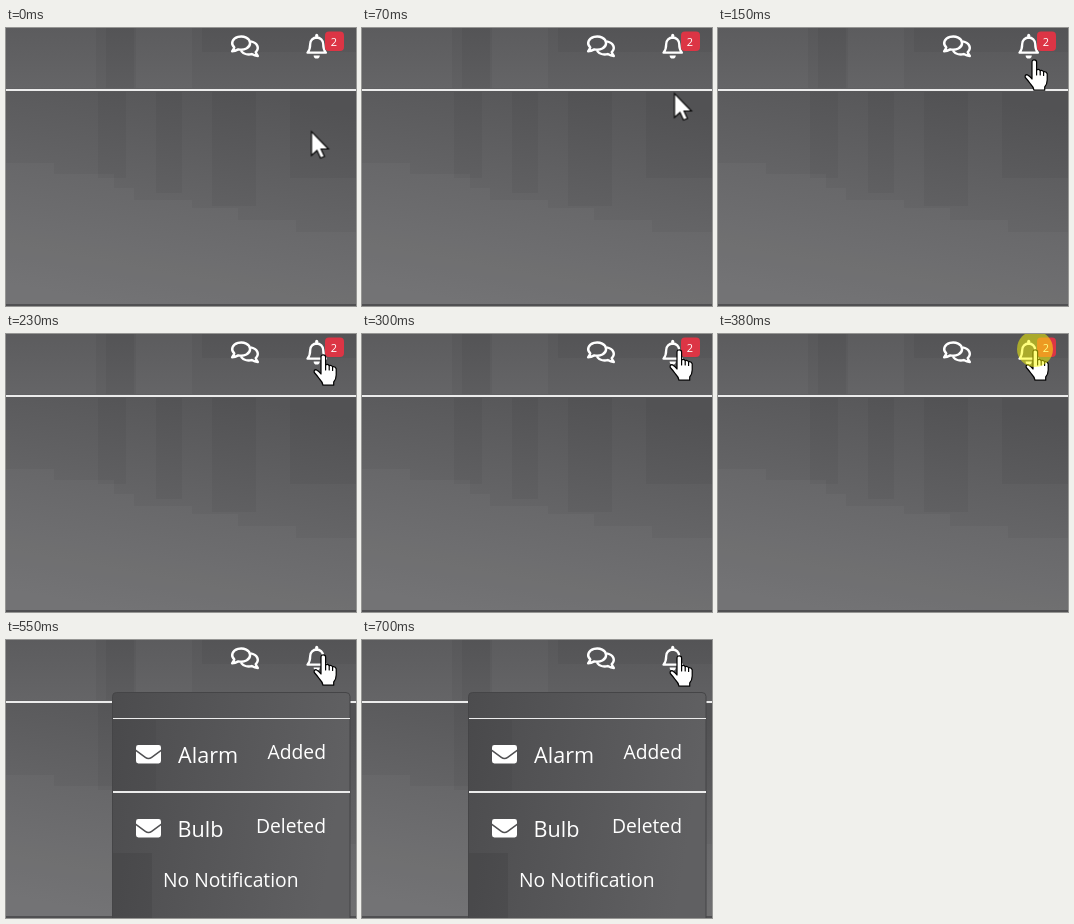
Write an HTML page that moves like this. It is 350x278 px and loops after 2.01 s.

```html
<!DOCTYPE html>
<html lang="en">
<head>
<meta charset="utf-8">
<title>Notification bell</title>
<style>
  html, body { margin: 0; width: 100%; height: 100%; overflow: hidden; background: #5c5c5e; }
  svg { display: block; width: 350px; height: 278px; }
  text { font-family: "Open Sans", "Noto Sans", sans-serif; fill: #fff; }
  .name { font-size: 21.6px; }
  .note { font-size: 19.3px; }
  .end { text-anchor: end; }
  .arrow, .hand, .badge, .click, .menu { animation: 2010ms step-end infinite; }
  .arrow { animation-name: arrow; }
  .hand { animation-name: hand; }
  .badge { animation-name: badge; }
  .click { animation-name: click; }
  .menu { animation-name: menu; }

  @keyframes arrow {
    0% { transform: translate(305.5px, 103.5px); opacity: 1; }
    3.4826% { transform: translate(312.5px, 65.5px); opacity: 1; }
    7.4627%, 100% { transform: translate(312.5px, 65.5px); opacity: 0; }
  }
  @keyframes hand {
    0% { transform: translate(306px, 31px); opacity: 0; }
    7.4627% { transform: translate(306px, 31px); opacity: 1; }
    11.4428% { transform: translate(307px, 20px); opacity: 1; }
    14.9254% { transform: translate(307px, 15px); opacity: 1; }
    27.3632% { transform: translate(307px, 14px); opacity: 1; }
    34.8259%, 100% { transform: translate(307px, 15px); opacity: 1; }
  }
  @keyframes badge {
    0% { opacity: 1; }
    27.3632%, 100% { opacity: 0; }
  }
  @keyframes click {
    0% { opacity: 0; }
    18.9055% { opacity: .5; }
    27.3632%, 100% { opacity: 0; }
  }
  @keyframes menu {
    0% { opacity: 0; }
    27.3632%, 100% { opacity: 1; }
  }
</style>
</head>
<body>
<svg viewBox="0 0 350 278">
  <defs>
    <linearGradient id="head" x2="0" y2="1">
      <stop stop-color="#58585a"/>
      <stop offset="1" stop-color="#616163"/>
    </linearGradient>
    <linearGradient id="wall" x1=".65" y1="0" x2=".35" y2="1">
      <stop stop-color="#565658"/>
      <stop offset=".5" stop-color="#646466"/>
      <stop offset="1" stop-color="#707072"/>
    </linearGradient>
    <linearGradient id="panel" x2="1" y2=".15">
      <stop stop-color="#4c4c4e"/>
      <stop offset=".45" stop-color="#555557"/>
      <stop offset="1" stop-color="#606062"/>
    </linearGradient>
    <g id="mail">
      <rect width="25" height="18.5" rx="2.4" fill="#fff"/>
      <path d="M-.5 5.2 9.3 12.3Q12.5 14.8 15.7 12.3L25.5 5.2" fill="none" stroke="#505052" stroke-width="1.5"/>
    </g>
  </defs>

  <rect width="350" height="62" fill="url(#head)"/>
  <rect y="62" width="350" height="216" fill="url(#wall)"/>
  <g fill="#fff" opacity=".025">
    <path d="M0 135H48V146H108V160H128V172H186V180H232V192H290V204H350V278H0Z"/>
    <path d="M0 220H60V230H158V238H188V250H240V278H0Z"/>
    <path d="M0 0H90V60H0ZM130 0H186V60H130Z"/>
  </g>
  <g fill="#000" opacity=".03">
    <path d="M92 64H120V150H92ZM150 64H176V165H150ZM206 64H250V178H206ZM284 64H350V150H284Z"/>
    <path d="M100 0H128V60H100ZM196 0H350V24H196Z"/>
  </g>
  <rect y="276" width="350" height="2" fill="#505052"/>
  <rect y="61" width="350" height="2" fill="#ececec"/>

  <g transform="translate(225 5.8) scale(.0486)" fill="none" stroke="#fff" stroke-width="50" stroke-linejoin="round">
    <path d="M67 279C55 318 24 360 24 360 75 360 115 342 150 321A184 136 0 1 0 67 279Z"/>
    <path d="M404 156A184 136 0 0 1 509 375C521 414 552 456 552 456 501 456 461 438 426 417A184 136 0 0 1 206 352"/>
  </g>

  <g transform="translate(300 6)" fill="none" stroke="#fff" stroke-width="2.3" stroke-linejoin="round">
    <path d="M1.5 18.7C3 17 4.2 15 4.2 10A6.5 6.5 0 0 1 17.2 10C17.2 15 18.4 17 19.9 18.7Z"/>
    <path d="M10.7 1.2V3.5" stroke-width="3" stroke-linecap="round"/>
    <path d="M7.6 21.4H13.8A3.1 3.1 0 0 1 7.6 21.4Z" fill="#fff" stroke="none"/>
  </g>

  <g class="badge">
    <rect x="319" y="3.5" width="19" height="19.5" rx="4" fill="#dc3545"/>
    <text x="328" y="18" font-size="11" text-anchor="middle">2</text>
  </g>

  <g class="menu">
    <path d="M106.5 278V56.5Q106.5 52.5 110.5 52.5H340Q344 52.5 344 56.5V278" fill="url(#panel)" stroke="#454547"/>
    <path d="M107 213H146V278H107Z" opacity=".07"/>
    <path d="M107 80H150V151H107Z" opacity=".04"/>
    <path d="M107 78.5H344" stroke="#ececec"/>
    <path d="M107 152H344" stroke="#ececec" stroke-width="2"/>
    <use href="#mail" x="130" y="105"/>
    <text class="name" x="172" y="123">Alarm</text>
    <text class="note end" x="320" y="119">Added</text>
    <use href="#mail" x="130" y="179"/>
    <text class="name" x="171.5" y="197">Bulb</text>
    <text class="note end" x="320" y="193">Deleted</text>
    <text class="note" x="157" y="247">No Notification</text>
  </g>

  <path class="arrow" d="M0 0V24L5.5 19 9 26.5 13 25 9.5 17.5H17Z" fill="#fff" stroke="#000" stroke-width="1.1"/>
  <g class="hand" stroke="#000" stroke-width="1.2" stroke-linejoin="round" stroke-linecap="round">
    <path d="M8 20V3Q8 .8 10.3 .8T12.6 3V11Q14.5 9.6 16.2 11.6 18.2 10.6 19.6 12.8 22.2 12 23.2 14.8V21Q23.2 25 20.7 28V31.2H10Q9.5 28 6.5 25 4 21.5 1.3 18.5 .5 15.6 3.2 15.7 6 17 8 20Z" fill="#fff"/>
    <path d="M12.6 11V16M16.2 11.8V16M19.6 13V16.5" fill="none"/>
  </g>
  <circle class="click" cx="317" cy="15" r="18" fill="#ff0"/>
</svg>
</body>
</html>
```
